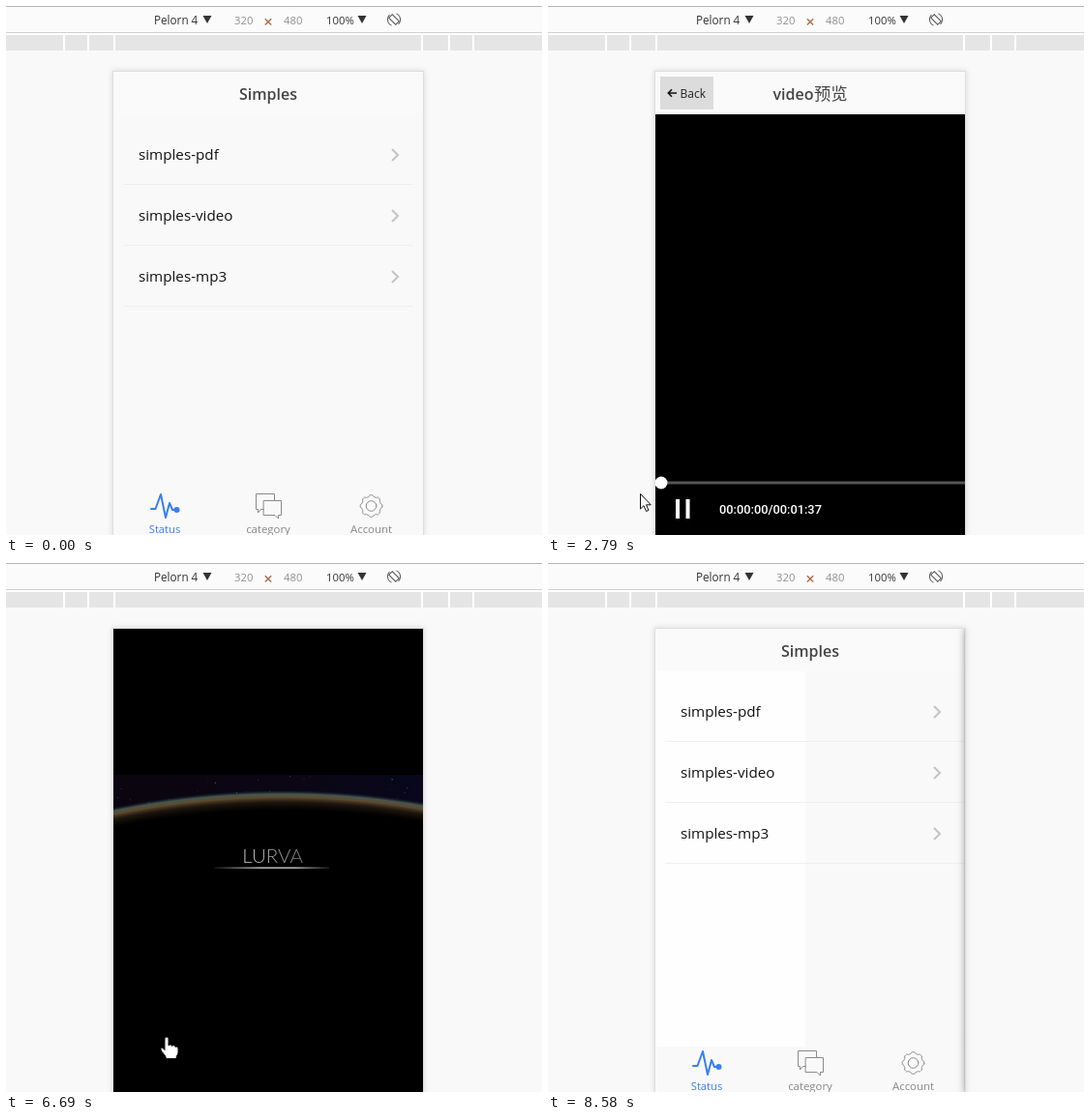
Recreate the animation shown at these times as an HTML page with a canvas. Size 554 by 547 pixels, loop 8.94 s.

```html
<!DOCTYPE html>
<html lang="en">
<head>
<meta charset="utf-8">
<title>Video preview</title>
<style>
html, body { margin: 0; width: 100%; height: 100%; overflow: hidden; background: #f9f9f9; }
canvas { display: block; }
</style>
</head>
<body>
<canvas id="stage" width="554" height="547"></canvas>
<script>
const ctx = document.getElementById('stage').getContext('2d');
const LOOP = 8940, SANS = '"Open Sans", sans-serif';
const OPEN = 480, CLOSE = 8094, SLIDE = 500;
const LOADED = 1700, PRESS_PLAY = 2490, PLAY = 2950, PAUSE = 7500;
const ROTATE = [4800, 5550], HIDE = [6330, 6780];

const clamp = v => Math.max(0, Math.min(1, v));
const ramp = (v, a, b) => clamp((v - a) / (b - a));
const mix = (a, b, k) => a + (b - a) * k;
const between = (t, [a, b]) => t >= a && t < b;

// cubic-bezier(.36, .66, .04, 1)
function ease(x) {
  if (x <= 0 || x >= 1) return clamp(x);
  let lo = 0, hi = 1;
  for (let i = 0; i < 20; i++) {
    const s = (lo + hi) / 2, r = 1 - s;
    if (3 * r * r * s * .36 + 3 * r * s * s * .04 + s ** 3 < x) lo = s; else hi = s;
  }
  const r = 1 - lo;
  return 3 * r * r * lo * .66 + 3 * r * lo * lo + lo ** 3;
}

function random(seed) {
  return () => (seed = (seed * 16807) % 2147483647) / 2147483647;
}

function group(x, y, draw) {
  ctx.save();
  ctx.translate(x, y);
  draw();
  ctx.restore();
}

function rect(x, y, w, h, color) {
  ctx.fillStyle = color;
  ctx.fillRect(x, y, w, h);
}

function dot(x, y, r, color) {
  ctx.fillStyle = color;
  ctx.beginPath();
  ctx.arc(x, y, r, 0, 7);
  ctx.fill();
}

function text(str, x, y, size, color, { weight = 400, align = 'left', family = SANS } = {}) {
  ctx.font = `${weight} ${size}px ${family}`;
  ctx.textAlign = align;
  ctx.fillStyle = color;
  ctx.fillText(str, x, y);
}

function stroke(path, color, width = 1) {
  ctx.strokeStyle = color;
  ctx.lineWidth = width;
  ctx.stroke(new Path2D(path));
}

function fill(path, color) {
  ctx.fillStyle = color;
  ctx.fill(new Path2D(path));
}

function toolbar(landscape) {
  rect(0, 0, 554, 28, '#fbfbfb');
  rect(0, 0, 554, 1, '#b4b4b4');
  rect(0, 27, 554, 1, '#cfcfcf');
  rect(0, 28, 554, 2, '#fff');
  rect(0, 30, 554, 16, '#e5e5e5');
  for (const x of [59, 84, 111, 429, 457, 482]) rect(x, 30, 2, 16, '#fff');
  const size = ['320', '480'];
  if (landscape) size.reverse();
  text('Pelorn 4', 153, 19, 11.7, '#333');
  fill('M203.5 10H212.5L208 18Z', '#333');
  text(size[0], 236, 19, 11.3, '#909090');
  stroke('M267.8 13.2L274.2 19.6M274.2 13.2L267.8 19.6', '#b06848', 1.4);
  text(size[1], 287, 19, 11.3, '#909090');
  text('100%', 331, 19, 11.3, '#333');
  fill('M363.5 10H372.5L368 18Z', '#333');
  group(401, 14, () => {
    ctx.rotate(-Math.PI / 4);
    ctx.strokeStyle = '#555';
    ctx.lineWidth = 1;
    ctx.strokeRect(-2.5, -5, 5, 10);
    for (const a of [-.4, Math.PI - .4]) {
      ctx.beginPath();
      ctx.arc(0, 0, 6.6, a, a + 2);
      ctx.stroke();
    }
  });
}

function gear(x, y) {
  ctx.strokeStyle = '#8a8a8a';
  ctx.lineWidth = 1;
  ctx.beginPath();
  for (let i = 0; i <= 96; i++) {
    const a = i / 96 * Math.PI * 2;
    const r = 10.6 + 1.4 * clamp(.5 + Math.cos(8 * a) * 1.5) - .7;
    ctx.lineTo(x + r * Math.cos(a), y + r * Math.sin(a));
  }
  ctx.closePath();
  ctx.stroke();
  ctx.beginPath();
  ctx.arc(x, y, 5.3, 0, 7);
  ctx.stroke();
}

function tabs() {
  rect(0, 432, 320, 48, '#f9f9f9');
  ctx.lineJoin = ctx.lineCap = 'round';
  stroke('M39 452H43.5L49 437L54 461L58 446L61 453H65', '#387ef5', 2);
  dot(65.5, 453, 3, '#387ef5');
  ctx.lineJoin = 'miter';
  stroke('M155.5 452.5H152.5L149.5 456V452.5H147.5V436.5H166.5V443.5M155.5 443.5H173.5V458.5H170.5V462L167 458.5H155.5Z', '#8a8a8a');
  gear(266.5, 449);
  text('Status', 53, 477, 11.2, '#387ef5', { align: 'center' });
  text('category', 160, 477, 11.4, '#888', { align: 'center' });
  text('Account', 266.5, 477, 11.4, '#888', { align: 'center' });
}

function listPage(p, closing) {
  rect(0, 0, 320, 480, '#f9f9f9');
  if (closing) rect(0, 44, 155, 388, '#fefefe');
  group(-106 * p, 0, () => {
    const shown = closing ? ramp(p, .5, 0) : 1;
    ['simples-pdf', 'simples-video', 'simples-mp3'].forEach((name, i) => {
      const y = 63 * i;
      rect(10, y + 116, 300, 1, '#efefef');
      if (p) rect(310, y + 116, 116, 1, '#efefef');
      ctx.globalAlpha = shown;
      text(name, 26, y + 91, 15.2, '#111');
      stroke(`M288 ${y + 80}L294 ${y + 86}L288 ${y + 92}`, '#c4c4c6', 2);
      ctx.globalAlpha = 1;
    });
    tabs();
  });
  rect(0, 0, 320, 44, '#fafafa');
  ctx.globalAlpha = 1 - .45 * p;
  text('Simples', 160 - 210 * p, 29, 16, '#444', { weight: 600, align: 'center' });
  ctx.globalAlpha = 1;
}

// Drawn in a 320 x 180 box
function film(time) {
  ctx.beginPath();
  ctx.rect(0, 0, 320, 180);
  ctx.clip();
  ctx.globalAlpha = clamp(time / .9);
  const sky = ctx.createLinearGradient(0, 0, 320, 0);
  const blue = ramp(time, 1, 4.5);
  sky.addColorStop(0, `rgb(${mix(17, 8, blue)},5,${mix(7, 16, blue)})`);
  sky.addColorStop(.6, `rgb(${mix(15, 9, blue)},6,${mix(9, 24, blue)})`);
  sky.addColorStop(1, `rgb(${mix(16, 6, blue)},7,${mix(8, 32, blue)})`);
  rect(0, 0, 320, 40, sky);

  const rnd = random(71);
  for (let i = 0; i < 46; i++) {
    const x = (rnd() * 340 - time * 5 + 340) % 340, y = rnd() * 34;
    const glow = (.15 + .6 * rnd() ** 2) * (.75 + .25 * Math.sin(time * 5 + i));
    rect(x, y, 1, 1, `rgba(${i % 3 ? '125,145,235' : '225,215,220'},${glow})`);
  }

  dot(174, 889, 869, '#000');
  const rim = ctx.createRadialGradient(174, 889, 852, 174, 889, 873);
  rim.addColorStop(0, 'rgba(30,20,10,0)');
  rim.addColorStop(.4, 'rgba(48,36,22,.6)');
  rim.addColorStop(.65, '#5e4a2e');
  rim.addColorStop(.82, '#46564e');
  rim.addColorStop(1, 'rgba(20,40,56,0)');
  dot(174, 889, 873, rim);

  const first = ramp(time, 2.3, 4), last = ramp(time, 2.9, 4.5);
  if (first > 0) {
    const ink = ctx.createLinearGradient(133, 0, 196, 0);
    ink.addColorStop(0, `rgba(230,230,230,${first})`);
    ink.addColorStop(1, `rgba(230,230,230,${last})`);
    text('LURVA', 164.5, 91, 20.5, ink, { weight: 300, align: 'center', family: 'Lato, sans-serif' });
    const line = ctx.createLinearGradient(105, 0, 223, 0);
    line.addColorStop(0, 'rgba(220,220,220,.1)');
    line.addColorStop(.4, `rgba(220,220,220,${first})`);
    line.addColorStop(.7, `rgba(220,220,220,${first})`);
    line.addColorStop(1, 'rgba(220,220,220,.1)');
    rect(105, 95.5, 118, 1.5, line);
  }
}

function controls(w, h, t, time) {
  rect(0, h - 56.5, w, 3, '#555');
  dot(6 + time * (w / 97), h - 55, 6.5, '#fff');
  if (between(t, [PRESS_PLAY, PAUSE])) {
    rect(21, h - 38, 4, 20, '#fff');
    rect(31.5, h - 38, 4, 20, '#fff');
  } else {
    const icon = `M20 ${h - 38}V${h - 18}L37 ${h - 28}Z`;
    ctx.lineJoin = 'round';
    fill(icon, '#fff');
    stroke(icon, '#fff', 2);
    ctx.lineJoin = 'miter';
  }
  const total = t < LOADED ? '00:00:00' : '00:01:37';
  text(`00:00:0${Math.floor(time)}/${total}`, 66, h - 23.5, 12.8, '#fff',
    { weight: 500, family: 'Roboto, sans-serif' });
}

function header(w) {
  rect(0, 0, w, 44, '#fafafa');
  rect(5, 5, 55, 34, '#dcdcdc');
  stroke('M13.5 22H22M17 18.3L13.3 22L17 25.7', '#111', 1.6);
  text('Back', 25.5, 27, 12, '#222');
  const x = w / 2 - 38.5;
  text('video', x, 29, 16, '#444', { weight: 600 });
  text('预览', x + 42.5, 29, 17.3, '#444', { family: '"Noto Sans CJK SC", "Noto Sans CJK", sans-serif' });
}

function playerPage(w, h, t) {
  const time = clamp((Math.min(t, PAUSE) - PLAY) / 10000) * 10;
  rect(0, 0, w, h, '#000');
  const scale = w / 320;
  group(0, Math.round((h - 180 * scale) / 2) + (scale === 1 ? 1 : 0), () => {
    ctx.scale(scale, scale);
    if (time > 0) film(time);
  });
  if (t < LOADED) {
    for (let i = 0; i < 3; i++) {
      const k = .5 + .5 * Math.cos((t - 1180 - (i - 2) * 130) / 750 * Math.PI * 2);
      const g = Math.round(mix(45, 120, k));
      dot(142.5 + 17.5 * i, 238, mix(4.6, 6.2, k), `rgb(${g},${g},${g})`);
    }
  }
  if (!between(t, HIDE)) {
    controls(w, h, t, time);
    header(w);
  }
}

function phone(t, landscape) {
  const [w, h] = landscape ? [480, 320] : [320, 480];
  const closing = t >= CLOSE;
  const p = closing ? 1 - ease((t - CLOSE) / SLIDE) : ease((t - OPEN) / SLIDE);
  group(271 - w / 2, 68, () => {
    ctx.save();
    ctx.shadowColor = 'rgba(0,0,0,.14)';
    ctx.shadowBlur = 6;
    rect(-1, -1, w + 2, h + 2, '#dedede');
    ctx.restore();
    ctx.beginPath();
    ctx.rect(0, 0, w, h);
    ctx.clip();
    if (p < 1) listPage(p, closing);
    if (p > 0) group(w * (1 - p), 0, () => {
      if (p < 1) {
        ctx.shadowColor = 'rgba(0,0,0,.4)';
        ctx.shadowBlur = 8;
        rect(0, 0, w, h, '#000');
        ctx.shadowBlur = 0;
        ctx.shadowColor = 'transparent';
      }
      playerPage(w, h, t);
    });
  });
}

// Pointer path: time, x, y
const PATH = [
  [0, 490, 560], [30, 488, 545], [400, 200, 216], [540, 200, 216], [900, 250, 560],
  [1800, 250, 560], [1830, 248, 526], [1890, 248, 523], [2010, 248, 523], [2340, 136, 523],
  [2560, 136, 523], [2900, 76, 495], [3200, 76, 495], [3390, 108, 497], [3500, 120, 490],
  [4200, 360, 45], [4290, 394, 16], [4500, 403, 12], [6070, 403, 12], [6320, 280, 340],
  [6690, 166, 490], [6780, 166, 490], [6990, 139, 513], [7520, 139, 513], [7860, 148, 92],
  [8100, 148, 92], [8160, 182, 90], [8480, 570, 40], [LOOP, 570, 40]
];
const HAND = 'M-2 2C-2-.5 2-.5 2 2V9C3 7.3 5.4 7.8 5.6 9.5C6.5 8.2 9 8.8 9 10.5C10 9.5 12 10.2 12 12V16C12 18.5 10 19 10 22.5H-.5C-.5 19-5.5 16-6 13C-6.5 10.5-4 10.5-2 13.5Z';
const ARROW = 'M.5.5V16L4 12.7L6.5 18.5L9 17.4L6.5 11.8H11.3Z';

function pointer(t) {
  const i = PATH.findIndex(k => k[0] > t);
  const [t0, x0, y0] = PATH[i - 1], [t1, x1, y1] = PATH[i];
  const k = (t - t0) / (t1 - t0);
  const x = Math.round(mix(x0, x1, k)), y = Math.round(mix(y0, y1, k));
  const shape = x > 111 && x < 431 && y > 68 ? HAND : ARROW;
  group(x, y, () => {
    fill(shape, '#fff');
    stroke(shape, '#111');
  });
}

function render(t) {
  const landscape = between(t, ROTATE);
  rect(0, 0, 554, 547, '#f9f9f9');
  toolbar(landscape);
  phone(t, landscape);
  if (t >= 30) pointer(t);
}

const start = performance.now();
function tick() {
  render((performance.now() - start) % LOOP);
  requestAnimationFrame(tick);
}
tick();
</script>
</body>
</html>
```
